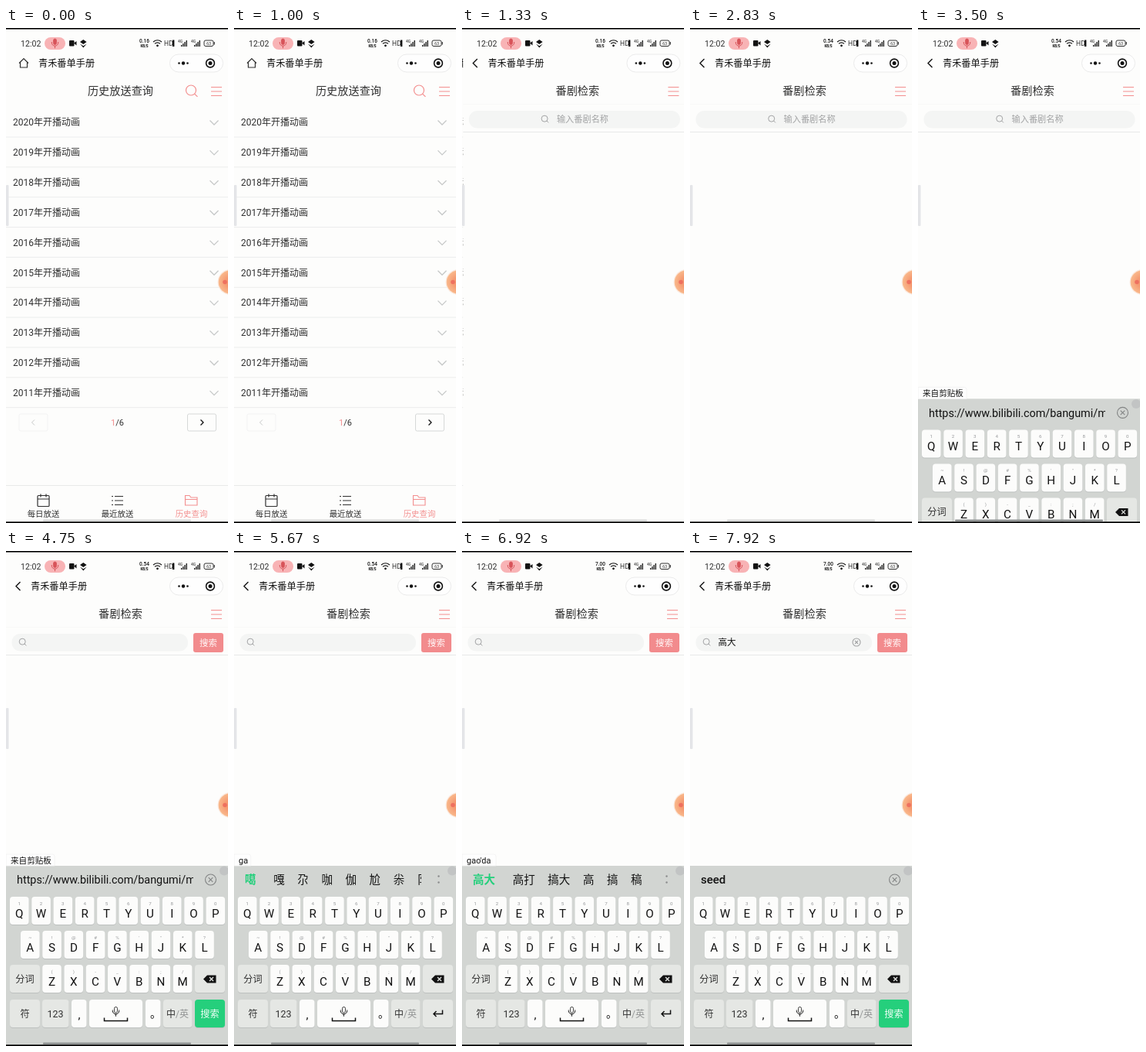
Animation of 288x640 px, one loop 8000 ms. Source, as an HTML page:

```html
<!DOCTYPE html>
<html lang="zh">
<head>
<meta charset="utf-8">
<style>
html, body { margin: 0; width: 100%; height: 100%; overflow: hidden; background: #fdfdfc; }
svg { display: block; width: 100vw; height: 100vh; }
text { font-family: Roboto, "Noto Sans CJK SC", "Noto Sans CJK", sans-serif; white-space: pre; }
</style>
</head>
<body>
<svg id="stage" viewBox="0 0 288 640"></svg>
<script>
const BG = '#fdfdfc', INK = '#303030', DARK = '#121212', GREY = '#a2a3a4', RULE = '#e8e9e9';
const SALMON = '#f38f8f', GREEN = '#25cf7c';
const LOOP = 8000, APP = '青禾番单手册';

// y is the visual middle of the text
const text = (x, y, s, size, fill = INK, more = '') =>
  `<text x="${x}" y="${y + size * .365}" font-size="${size}" fill="${fill}" ${more}>${s}</text>`;
const mid = (x, y, s, size, fill, more = '') => text(x, y, s, size, fill, 'text-anchor="middle" ' + more);
const rect = (x, y, w, h, fill, r = 0, more = '') =>
  `<rect x="${x}" y="${y}" width="${w}" height="${h}" rx="${r}" fill="${fill}" ${more}/>`;
const line = (d, stroke, w = 1, more = '') =>
  `<path d="${d}" fill="none" stroke="${stroke}" stroke-width="${w}" ${more}/>`;
const dot = (x, y, r, fill, more = '') => `<circle cx="${x}" cy="${y}" r="${r}" fill="${fill}" ${more}/>`;
const ring = (x, y, r, stroke, w = 1) => dot(x, y, r, 'none', `stroke="${stroke}" stroke-width="${w}"`);
const group = (id, body) => `<g id="${id}">${body}</g>`;

const lens = (x, y, r, color, w) =>
  ring(x, y, r, color, w) + line(`M${x + r * .7} ${y + r * .7}l${r * .6} ${r * .6}`, color, w);
const clear = (x, y, r, color) => {
  const k = r * .4;
  return ring(x, y, r, color, 1.1) +
    line(`M${x - k} ${y - k}l${2 * k} ${2 * k}m0 ${-2 * k}l${-2 * k} ${2 * k}`, color, 1.1);
};
const mic = (x, y, color, fill = color) =>
  rect(x - 2, y - 6, 4, 7.5, fill, 2, `stroke="${color}" stroke-width=".8"`) +
  line(`M${x - 4.2} ${y - 2}v1a4.200 4.200 0 0 0 8.400 0v-1M${x} ${y + 3.2}v3`, color, 1);

function statusBar() {
  const signal = x => text(x, 17, '4G', 5, DARK) +
    [0, 1, 2, 3].map(i => rect(x + 4 + i * 2.2, 22 - i * 2, 1.3, 2 + i * 2, DARK)).join('');
  return rect(0, 0, 288, 29, BG) + text(19, 20, '12:02', 10.6, INK) +
    rect(50, 12, 27, 16, '#f8b3b5', 8) + mic(63.5, 20, '#d8545a') +
    rect(82, 16, 6.5, 7.5, DARK, 1) + '<path d="M88 19.500l3.500-2.500v5.500zM96 18l4.300-3 4.300 3-4.300 3zM96 20.500l4.300 2.700 4.300-2.700-4.300 5z" fill="#121212"/>' +
    `<text id="speed" x="179.500" y="19" font-size="6.500" font-weight="500" text-anchor="middle" fill="${DARK}"></text>` +
    mid(179.5, 23, 'KB/S', 4.5, DARK, 'font-weight="600"') +
    line('M191 18q5.500-4.500 11 0M193 20.300q3.500-3 7 0', DARK, 1.2) + dot(196.5, 22.8, 1.4, DARK) +
    text(205, 20, 'HD', 8.6, INK) + rect(216, 15.5, 2.4, 8.5, DARK) +
    signal(223) + signal(240) +
    rect(257, 16, 12, 7.5, 'none', 2, `stroke="${INK}"`) + rect(269.6, 18, 1.2, 3.5, INK) + mid(263, 19.8, '63', 5.5, INK);
}

const capsule = rect(212.5, 34, 69, 23, '#fefefe', 11.5, 'stroke="#ebebeb"') +
  dot(224.5, 45.5, 1.3, DARK) + dot(230, 45.5, 2.2, DARK) + dot(235.5, 45.5, 1.3, DARK) +
  ring(265, 45.5, 5.4, DARK, 1.6) + dot(265, 45.5, 2.5, DARK);
const menu = line('M266 76.500h14M266 82h14M266 87.500h14', SALMON, 1.2);

const page = (title, body) => rect(0, 29, 288, 611, BG) + capsule + menu + mid(148.5, 81, title, 14.2) + body;

function listPage() {
  let s = line('M17 45.500l6-6 6 6M18.500 44.500v6.500h9v-6.500', INK, 1.2) + text(42, 45.5, APP, 12.2, DARK) +
    lens(240, 80.5, 6.5, SALMON, 1.2);
  for (let i = 0; i < 10; i++) {
    const y = 122 + i * 38.85;
    s += text(9, y, 2020 - i + '年开播动画', 12) +
      line(`M264.500 ${y - 2.5}l5.500 5.500 5.500-5.500`, '#c6c8c8', 1.3) +
      line(`M0 ${y + 19}h288`, RULE, .8);
  }
  s += rect(17, 499, 37, 22, 'none', 2, 'stroke="#f3f3f3"') + line('M37 506.500l-3.500 3.500 3.500 3.500', '#c6c8c8') +
    mid(144.5, 510, `<tspan fill="${SALMON}">1</tspan>/6`, 11) +
    rect(235.5, 499, 37, 22, 'none', 2, 'stroke="#d6d8d8"') + line('M252.500 506.500l3.500 3.500-3.500 3.500', DARK, 1.3) +
    line('M0 591.500h288', RULE);
  s += rect(41, 604.5, 15, 14, 'none', 1, `stroke="${INK}" stroke-width="1.200"`) +
    line('M41 609h15M45 602.500v4M52 602.500v4', INK, 1.2) +
    line('M141 605.500h11M141 611h11M141 616.500h11M137 605.500h2M137 611h2M137 616.500h2', INK, 1.2) +
    line('M232.500 617v-12.500h5.500l2 2.500h8v10zM232.500 609.500h15.500', SALMON, 1.1);
  [['每日放送', INK], ['最近放送', INK], ['历史查询', SALMON]]
    .forEach(([label, c], i) => s += mid(48.5 + i * 96, 628, label, 10.4, c));
  return page('历史放送查询', s);
}

function searchPage() {
  return page('番剧检索',
    line('M18.500 40l-5.500 5.500 5.500 5.500', DARK, 1.4) + text(32, 45.5, APP, 12.2, DARK) +
    line('M0 98.500h288', '#f8f8f8') + line('M0 134.500h288', RULE) +
    `<rect id="field" x="7.500" y="107" height="22.500" rx="11" fill="#f4f5f4"/>` +
    group('glass', lens(-.8, 117.2, 4, GREY, 1)) +
    group('hint', text(121.5, 118, '输入番剧名称', 11.2, GREY)) +
    group('query', text(36.5, 118, '高大', 11.6, DARK) + clear(216, 118, 5, GREY)) +
    group('button', rect(0, 106, 39, 25, '#f28b8d', 3) + mid(19.5, 118.5, '搜索', 11.4, '#fff8f8')));
}

function keyboard() {
  const FN = '#e5e7e4', KEY = '#fcfcfb';
  const key = (x, y, w, fill = KEY) =>
    rect(x, y + 1, w, 36, '#bec1c0', 4) + rect(x, y, w, 36, fill, 4);
  const row = (x0, y, letters, marks) => [...letters].map((c, i) => {
    const x = x0 + i * 28.28;
    return key(x, y, 24.6) + mid(x + 12.3, y + 21.5, c, 15.2, DARK) + mid(x + 12.3, y + 8.5, marks[i], 6.2, '#96989a');
  }).join('');
  return rect(0, 407, 288, 233, '#d2d5d2') +
    group('strip', '') + dot(283, 413.5, 6, '#c2c4c4') +
    row(5, 447, 'QWERTYUIOP', '1234567890') +
    row(19, 491, 'ASDFGHJKL', '~!@#%\'"*?') +
    row(47.2, 535, 'ZXCVBNM', '()-_:;/') +
    key(5, 535, 39, FN) + mid(24.5, 553.5, '分词', 12.2) +
    key(245, 535, 39, FN) + '<path d="M256 553.500l5-5h11.500v10h-11.500z" fill="#121212"/>' +
    line('M264 551l5 5m0-5l-5 5', FN, 1.3) +
    key(5, 580, 39, FN) + mid(24.5, 598.5, '符', 12.2) +
    key(47, 580, 34.5, FN) + mid(64, 598.5, '123', 12.5) +
    key(85, 580, 19.5) + mid(95, 600, ',', 15, DARK) +
    key(108, 580, 69) + mic(142.5, 595.5, DARK, KEY) + line('M127.500 603.500v4h30v-4', DARK, 1.5) +
    key(181, 580, 19.5) + text(187, 598, '。', 14, DARK) +
    key(204, 580, 37.5, FN) + mid(222.5, 598.5, '中<tspan fill="#939595">/英</tspan>', 12) +
    group('send', key(245, 580, 39, GREEN) + mid(264.5, 598.5, '搜索', 12.2, '#f2fff8')) +
    group('enter', key(245, 580, 39, FN) + line('M270.500 593.500v5h-11.500m3.500-3.500l-3.500 3.500 3.500 3.500', DARK, 1.5));
}

stage.innerHTML = '<clipPath id="cut"><path d="M0 400h243v45H0z"/></clipPath>' +
  '<radialGradient id="sun"><stop offset=".4" stop-color="#f59a72"/><stop offset="1" stop-color="#f9b98c"/></radialGradient>' +
  group('list', listPage()) + group('search', searchPage()) + group('keys', keyboard()) +
  statusBar() + rect(0, 203, 3.5, 53, '#e4e5e8', 1) +
  dot(291, 328.5, 16.5, '#fbe9de') + dot(291, 328.5, 15.3, 'url(#sun)') + dot(284, 328.5, 2.8, '#ee7160') +
  '<rect id="home" x="48" y="635.500" width="192" height="2.500" rx="1"/>' +
  rect(0, 0, 288, 1.6, '#000') + rect(0, 638.3, 288, 1.7, '#000');

const $ = id => document.getElementById(id);
const show = (id, on) => $(id).setAttribute('display', on ? 'inline' : 'none');
const move = (id, x, y = 0) => $(id).setAttribute('transform', `translate(${x} ${y})`);
const span = (t, start, length) => Math.min(1, Math.max(0, (t - start) / length));
const easeOut = p => 1 - (1 - p) ** 3;
const mix = (a, b, p) => a + (b - a) * p;

// [time, composed letters, candidates]
const typed = [
  [5250, 'g', '个 给 过 国 该 跟 干 高'],
  [5500, 'ga', '噶 嘎 尕 咖 伽 尬 尜 阝'],
  [6000, 'gao', '高 搞 告 稿 膏 糕 镐 羔'],
  [6330, "gao'd", '高度 高等 搞定 高 搞 稿'],
  [6660, "gao'da", '高大 高打 搞大 高 搞 稿']
];
const COMMIT = 7330;

function bubble(s, size, w) {
  return `<path d="M0 392h${w - 3}q3 0 3 3v12H0z" fill="#fefefe" stroke="#f2f2f2" stroke-width=".8"/>` +
    text(6, 399.7, s, size, DARK);
}

function candidates(words) {
  let x = 14, s = '';
  words.split(' ').forEach((w, i) => {
    s += text(x, 425, w, 14.5, i ? DARK : GREEN, `font-weight="${i ? 500 : 700}"`);
    x += w.length * 14.5 + (i ? 16.6 : 22.7);
  });
  return `<g clip-path="url(#cut)">${s}</g>` + dot(265.5, 420.5, 1.2, '#8a8c8c') + dot(265.5, 428.5, 1.2, '#8a8c8c');
}

function stripFor(t) {
  const close = clear(265.5, 425, 7, '#828484');
  if (t >= COMMIT) return text(14, 425, 'seed', 15, DARK, 'font-weight="500"') + close;
  const now = typed.filter(k => t >= k[0]).pop();
  if (now) return bubble(now[1], 11, 10.5 + now[1].length * 5.6) + candidates(now[2]);
  return bubble('来自剪贴板', 10.6, 63) +
    `<g clip-path="url(#cut)">${text(14, 425, 'https://www.bilibili.com/bangumi/m', 14.4, DARK)}</g>` + close;
}

let lastStrip;
function draw(t) {
  const slide = easeOut(span(t, 1040, 350));
  move('list', -72 * slide);
  move('search', 288 * (1 - slide));
  show('list', slide < 1);
  show('search', slide > 0);

  const p = span(t, 3750, 300), open = p ** .88;
  $('field').setAttribute('width', mix(274, 228.5, open));
  move('button', mix(289, 243, open));
  $('button').setAttribute('opacity', open);
  move('glass', mix(106.5, 22, p ** 1.5));
  show('hint', p === 0);
  show('query', t >= COMMIT);

  const rise = easeOut(span(t, 3400, 300));
  show('keys', rise > 0);
  move('keys', 0, 248 * (1 - rise));
  const composing = t >= typed[0][0] && t < COMMIT;
  show('send', !composing);
  show('enter', composing);
  const strip = stripFor(t);
  if (strip !== lastStrip) $('strip').innerHTML = lastStrip = strip;

  $('home').setAttribute('fill', rise > .1 ? '#929595' : '#d9dada');
  $('speed').textContent = t < 2000 ? '0.16' : t < 6170 ? '0.54' : '7.00';
}

function frame() {
  draw(performance.now() % LOOP);
  requestAnimationFrame(frame);
}
frame();
</script>
</body>
</html>
```
